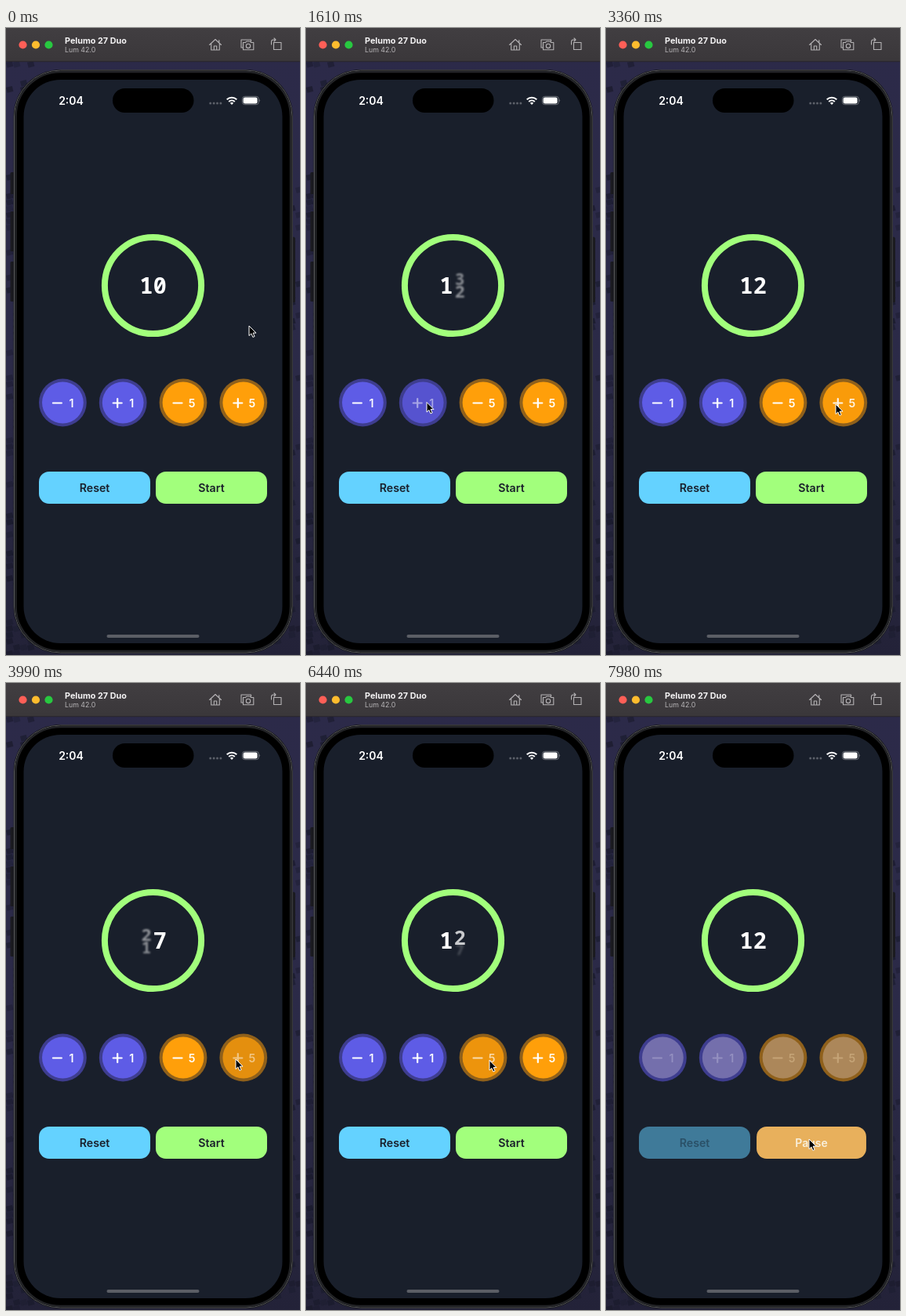
Recreate the animation shown at these times as an HTML page. Size 375 px wide and 800 px high, loop 8000 ms.

```html
<!DOCTYPE html>
<html lang="en">
<head>
<meta charset="utf-8">
<title>Countdown timer</title>
<style>
  html, body { margin: 0; width: 100%; height: 100%; overflow: hidden; background: #29283f; }
  svg { display: block; width: 375px; height: 800px; }
  text { font-family: Inter, "Open Sans", sans-serif; }
  .digit { font: 700 28.5px "Noto Sans Mono", "DejaVu Sans Mono", monospace; fill: #fff; text-anchor: middle; }
  .label { font-size: 14.2px; font-weight: 600; text-anchor: middle; }
</style>
</head>
<body>
<svg viewBox="0 0 375 800">
  <defs>
    <linearGradient id="wall" x1="0" y1="0" x2="0" y2="1">
      <stop offset="0" stop-color="#2c2a49"/>
      <stop offset=".6" stop-color="#2b2a47"/>
      <stop offset="1" stop-color="#232238"/>
    </linearGradient>
    <linearGradient id="bar" x1="0" y1="0" x2="0" y2="1">
      <stop offset="0" stop-color="#413e41"/>
      <stop offset="1" stop-color="#3a373a"/>
    </linearGradient>
  </defs>
  <rect width="375" height="800" fill="url(#wall)"/>
  <g id="checks" fill="#191a2b"></g>

  <!-- title bar -->
  <rect width="375" height="43" fill="url(#bar)"/>
  <rect y="42.4" width="375" height=".8" fill="#232126"/>
  <circle cx="21.5" cy="21.5" r="5.1" fill="#ff5f57"/>
  <circle cx="38" cy="21.5" r="5.1" fill="#febc2e"/>
  <circle cx="54.5" cy="21.5" r="5.1" fill="#28c840"/>
  <text x="75" y="20" font-size="10.8" font-weight="700" fill="#f4f3f4">Pelumo 27 Duo</text>
  <text x="75" y="31.2" font-size="8.8" fill="#b7b5b7">Lum 42.0</text>
  <g fill="none" stroke="#b4b2b4" stroke-width="1.1" stroke-linecap="round" stroke-linejoin="round">
    <path d="M259.5 21.5 267 14.5 274.5 21.5M261.7 20V28H272.3V20M265.3 28V23H268.7V28M271.8 15.5V18.5"/>
    <path d="M302 25H300V15H312.500V17M302.500 18.500H305.500L306.800 17H311.200L312.500 18.500H315.800V27.800H302.500Z"/>
    <circle cx="309" cy="22.900" r="2.700"/>
    <path d="M341.500 18.500H351V27.500H341.500ZM338.500 21V17.500Q338.500 15 341 15H343.500M342 13 344 15 342 17"/>
  </g>

  <!-- handset -->
  <g fill="#1b1b20">
    <rect x="5.500" y="184" width="6" height="28" rx="1.500"/>
    <rect x="5.500" y="234" width="6" height="51" rx="1.500"/>
    <rect x="5.500" y="298" width="6" height="51" rx="1.500"/>
    <rect x="363" y="267" width="6" height="83" rx="1.500"/>
  </g>
  <rect x="9.500" y="53" width="356.500" height="745" rx="60" fill="#17181a"/>
  <rect x="10.500" y="54" width="354.500" height="743" rx="59" fill="#000" stroke="#5a5b5e"/>
  <rect x="12.500" y="56" width="350.500" height="739" rx="57" fill="#000" stroke="#222326" stroke-width="2.500"/>
  <rect x="22.500" y="66" width="330" height="719" rx="47" fill="#191f2b"/>
  <rect x="136" y="77" width="103.500" height="31" rx="15.500" fill="#000"/>

  <!-- status row -->
  <text x="83" y="97.600" class="label" fill="#fff" style="font-size:14px">2:04</text>
  <g fill="#5c6069">
    <circle cx="260.700" cy="96" r="1.500"/><circle cx="265.100" cy="96" r="1.500"/>
    <circle cx="269.500" cy="96" r="1.500"/><circle cx="273.900" cy="96" r="1.500"/>
  </g>
  <g fill="none" stroke="#fff" stroke-width="2">
    <path d="M281.700 91.200A9 9 0 0 1 294.300 91.200M284.200 94A5.500 5.500 0 0 1 291.800 94"/>
    <path d="M288 98 285.900 95.800A3 3 0 0 1 290.100 95.800Z" fill="#fff" stroke="none"/>
  </g>
  <rect x="301.400" y="87.300" width="21" height="10.400" rx="3.300" fill="none" stroke="#777b83" stroke-width=".9"/>
  <rect x="302.600" y="88.500" width="18" height="8" rx="2.200" fill="#fff"/>
  <path d="M323.500 90.700Q325 92.500 323.500 94.300Z" fill="#777b83"/>

  <circle cx="187.500" cy="328.500" r="61.600" fill="none" stroke="#a2ff7c" stroke-width="8"/>
  <g id="digits"></g>
  <g id="rounds"></g>

  <g id="reset">
    <rect x="42" y="566" width="142" height="41" rx="13"/>
    <text x="113" y="591.700" class="label">Reset</text>
  </g>
  <g id="main">
    <rect x="191" y="566" width="142" height="41" rx="13"/>
    <text x="262" y="591.700" class="label">Start</text>
  </g>
  <rect x="128.500" y="774" width="118" height="4" rx="2" fill="#5b5e65"/>
  <path id="cursor" d="M0 0V12.600L2.900 9.900 4.900 14.500 7.100 13.500 5.100 9.100H9Z" fill="#000" stroke="#fff" stroke-width="1" stroke-linejoin="round"/>
</svg>
<script>
const LOOP = 8000, STEP = 70;
const $ = id => document.getElementById(id);
const clamp = v => Math.max(0, Math.min(1, v));
const smooth = v => v * v * (3 - 2 * v);
const span = (t, a, b) => clamp((t - a) / (b - a));
const mix = (a, b, k) => a + (b - a) * k;
const mixRgb = (a, b, k) => `rgb(${a.map((v, i) => Math.round(mix(v, b[i], k)))})`;

const INK = [25, 31, 43], WHITE = [255, 255, 255];
const GREEN = [162, 255, 124], BLUE = [100, 210, 255];

// release time, button index, value afterwards
const taps = [
  [690, 1, 11], [1100, 1, 12], [1510, 1, 13], [2210, 0, 12],
  [3460, 3, 17], [3880, 3, 22], [5700, 2, 17], [6250, 2, 12]
];

// start, end, x, y
const moves = [
  [0, 560, 154, 477.5], [1750, 2050, 92, 480], [2590, 3150, 293, 480],
  [4200, 4900, 234, 481.5], [6700, 7350, 261, 568.5], [7350, 7630, 259, 582]
];

const purple = { fill: [94, 92, 230], edge: [62, 61, 143], off: [116, 111, 172], offText: [148, 144, 192] };
const orange = { fill: [255, 159, 10], edge: [143, 96, 27], off: [172, 135, 90], offText: [197, 164, 119] };
const rounds = [
  { x: 72.4, look: purple, sign: "-", n: 1 }, { x: 149.2, look: purple, sign: "+", n: 1 },
  { x: 226, look: orange, sign: "-", n: 5 }, { x: 302.8, look: orange, sign: "+", n: 5 }
];

function build() {
  let seed = 11;
  const rnd = () => (seed = (seed * 16807) % 2147483647) / 2147483647;
  let checks = "";
  for (let y = 44; y < 800; y += 8)
    for (let x = 0; x < 375; x += 9) {
      const left = x < 36 && (y < 90 || y > 180);
      if (rnd() < (left ? .42 : x > 340 && y > 200 ? .16 : 0))
        checks += `<rect x="${x}" y="${y}" width="8" height="7" transform="rotate(-14 ${x} ${y})" opacity="${.35 + rnd() * .45}"/>`;
    }
  $("checks").innerHTML = checks;

  $("digits").innerHTML = '<text class="digit" y="10.2"></text>'.repeat(4);
  $("rounds").innerHTML = rounds.map(b => `<g transform="translate(${b.x} 478)">
    <circle r="30.4" fill="rgb(${b.look.edge})"/><circle r="26.4"/>
    <g><path d="M-12.500 .5H-1.500${b.sign === "+" ? "M-7 -5V6" : ""}" stroke-width="2.2" stroke-linecap="round"/>
    <text class="label" x="11" y="5.500">${b.n}</text></g></g>`).join("");
}

function drawGlyph(el, char, x, dy, away) {
  el.textContent = char;
  el.setAttribute("transform", `translate(${x} ${328.8 + dy}) scale(${1 - away * .5})`);
  el.style.opacity = 1 - away;
  el.style.filter = away > .01 ? `blur(${away * 3.4}px)` : "none";
}

function drawNumber(t) {
  let from = "10", to = "10", start = -LOOP;
  for (const [at, , value] of taps)
    if (t >= at) { from = to; to = String(value); start = at; }
  const tensMove = from[0] !== to[0];
  const glyphs = $("digits").children;
  for (let i = 0; i < 2; i++) {
    const delay = i && tensMove ? 110 : 0;
    const u = from[i] === to[i] ? 1 : span(t, start + delay, start + delay + 500);
    const p = 1 - (1 - u) ** 3, x = i ? 196.2 : 179;
    drawGlyph(glyphs[i * 2], from[i], x, 16 * p, p);
    drawGlyph(glyphs[i * 2 + 1], to[i], x, -16 * (1 - p), 1 - p);
  }
}

function pressed(t, index) {
  let d = 0;
  for (const [at, button] of taps)
    if (button === index)
      d = Math.max(d, t < at ? span(t, at - 110, at - 50) : 1 - smooth(span(t, at, at + 400)));
  return d;
}

function drawButtons(t) {
  const off = smooth(span(t, 7850, 7980));
  rounds.forEach((b, i) => {
    const g = $("rounds").children[i], d = pressed(t, i);
    g.children[1].setAttribute("fill", mixRgb(b.look.fill, b.look.off, off));
    g.children[1].setAttribute("opacity", 1 - .3 * d);
    const color = mixRgb(WHITE, b.look.offText, off);
    g.children[2].setAttribute("fill", color);
    g.children[2].setAttribute("stroke", "none");
    g.children[2].children[0].setAttribute("stroke", color);
    g.children[2].setAttribute("opacity", 1 - .62 * d);
  });

  const [resetBox, resetText] = $("reset").children;
  resetBox.setAttribute("fill", mixRgb(BLUE, [63, 122, 153], off));
  resetText.setAttribute("fill", mixRgb(INK, [42, 80, 103], off));

  const [box, text] = $("main").children, running = t >= 7910;
  const down = span(t, 7770, 7840);
  box.setAttribute("fill", running ? mixRgb([205, 200, 105], [232, 176, 92], off)
                                   : mixRgb(GREEN, [126, 195, 99], down));
  text.textContent = running ? "Pause" : "Start";
  text.setAttribute("fill", running ? "#f8efdc" : mixRgb(INK, [60, 85, 60], down));
  const s = 1 - .015 * down;
  $("main").setAttribute("transform", `translate(262 586.5) scale(${s} 1) translate(-262 -586.5)`);
}

function drawCursor(t) {
  let x = 310, y = 380;
  for (const [a, b, toX, toY] of moves) {
    const k = smooth(span(t, a, b));
    x = mix(x, toX, k);
    y = mix(y, toY, k);
  }
  $("cursor").setAttribute("transform", `translate(${x} ${y})`);
}

function draw(ms) {
  const t = Math.floor((ms % LOOP) / STEP) * STEP;
  drawNumber(t);
  drawButtons(t);
  drawCursor(t);
}

build();
draw(0);
const begin = performance.now();
function tick() {
  draw(performance.now() - begin);
  requestAnimationFrame(tick);
}
requestAnimationFrame(tick);
</script>
</body>
</html>
```
